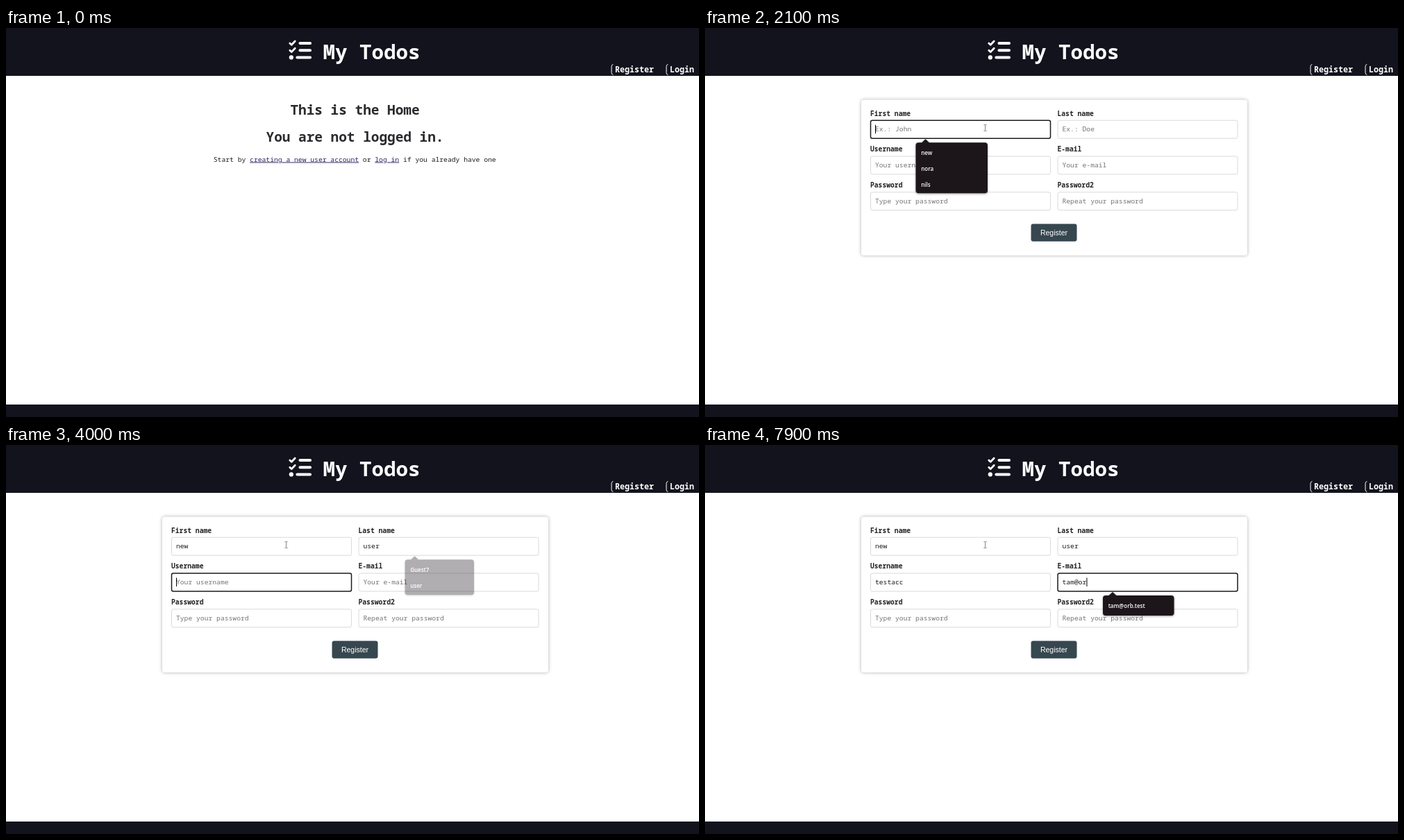
Recreate the animation shown at these times as an HTML page. Size 998x561 px, loop 8 s.

```html
<!DOCTYPE html>
<html lang="en">
<head>
<meta charset="utf-8">
<title>My Todos</title>
<style>
  html, body { margin: 0; width: 100%; height: 100%; overflow: hidden; background: #fff; }
  svg { display: block; }
  text { font-family: "Noto Sans Mono", monospace; font-size: 9.7px; fill: #1c1c20; white-space: pre; }
  .bar { fill: #12131d; }
  .title { font-size: 29.2px; font-weight: 700; fill: #fff; }
  .nav { font-size: 11.67px; font-weight: 700; fill: #fff; }
  .head { font-size: 19.4px; font-weight: 600; fill: #2b2b2f; text-anchor: middle; }
  .link { fill: #33245f; text-decoration: underline; }
  .label { font-weight: 600; fill: #222; }
  .hint { fill: #757575; }
  .card { fill: #fff; filter: drop-shadow(0 0 2.5px rgba(0, 0, 0, .32)); }
  .input { fill: #fff; stroke: #d9d9db; }
  .focus { stroke: #1b1b20; stroke-width: 1.5; }
  .button { font: 10.5px "Liberation Sans", Arial, sans-serif; fill: #fff; text-anchor: middle; }
  .pop { fill: #1c161b; filter: drop-shadow(0 1px 1.5px rgba(0, 0, 0, .4)); }
  .option { font: 600 8px "Open Sans", sans-serif; fill: #fff; }
  .status { font: 6.2px "Open Sans", sans-serif; fill: #c8c8cc; }
</style>
</head>
<body>
<svg width="998" height="561" viewBox="0 0 998 561">
  <rect class="bar" width="998" height="69"/>
  <rect class="bar" y="543" width="998" height="18"/>
  <g fill="none" stroke="#fff" stroke-linecap="round" stroke-linejoin="round">
    <path stroke-width="4.1" d="M423.5 22H438M423.5 32.3H438M419.4 42.5H438"/>
    <path stroke-width="2.8" d="M408.8 22l2.4 2.3 5-5.3M408.8 32.3l2.4 2.3 5-5.3"/>
    <path stroke-width="1" d="M874 52.5q-2 .5-2 3v9q0 2.500 2 3M953 52.500q-2 .5-2 3v9q0 2.500 2 3"/>
  </g>
  <circle cx="410.8" cy="42.4" r="3.100" fill="#fff"/>
  <text class="title" x="456.500" y="44.500">My Todos</text>
  <text class="nav" x="877" y="63.800">Register</text>
  <text class="nav" x="956" y="63.800">Login</text>

  <g id="home">
    <text class="head" x="502.500" y="124.500">This is the Home</text>
    <text class="head" x="502.500" y="163.500">You are not logged in.</text>
    <text x="298.800" y="192.500">Start by <tspan class="link">creating a new user account</tspan> or <tspan class="link">log in</tspan> if you already have one</text>
  </g>
  <g id="form"></g>
  <g id="overlay"></g>
</svg>
<script>
const LOOP = 8000, STEP = 100, ADVANCE = 5.82;
const [home, form, overlay] = ['home', 'form', 'overlay'].map(id => document.getElementById(id));

const fields = [
  ['First name', 'Ex.: John'], ['Last name', 'Ex.: Doe'],
  ['Username', 'Your username'], ['E-mail', 'Your e-mail'],
  ['Password', 'Type your password'], ['Password2', 'Repeat your password']
].map(([label, hint], i) => ({
  label, hint, x: i % 2 ? 508 : 238.5, y: 133.2 + 51.8 * (i >> 1)
}));

// Keyboard: [time, field, characters typed so far]
const values = ['new', 'user', 'testacc', 'tam@or'];
const keys = [
  [1900, 0, 0], [2500, 0, 1], [2800, 0, 2], [3000, 0, 3],
  [3100, 1, 0], [3600, 1, 1], [3700, 1, 2], [3800, 1, 4],
  [4000, 2, 0], [5000, 2, 1], [5100, 2, 3], [5300, 2, 4], [5400, 2, 5], [5500, 2, 6], [5600, 2, 7],
  [6100, 3, 0], [6700, 3, 1], [6800, 3, 2], [6900, 3, 3], [7300, 3, 4], [7800, 3, 5], [7900, 3, 6]
];

// Suggestions: [from, to, field, left, width, options, fades out]
const popups = [
  [2000, 2800, 0, 303.5, 103.5, ['new', 'nora', 'nils']],
  [2800, 3100, 0, 303.5, 103.5, ['new']],
  [3600, 4100, 1, 574.5, 99.5, ['Guest7', 'user'], true],
  [6700, 8000, 3, 573, 102.5, ['tam@orb.test']]
];

const text = (cls, x, y, str) => `<text class="${cls}" x="${x}" y="${y}">${str}</text>`;
const box = (cls, x, y, w, h, r) =>
  `<rect class="${cls}" x="${x}" y="${y}" width="${w}" height="${h}" rx="${r}"/>`;

function drawForm(t) {
  const done = keys.filter(k => k[0] <= t);
  const last = done[done.length - 1];
  let out = box('card', 225, 103.5, 556, 224.5, 4);
  fields.forEach(({ label, hint, x, y }, i) => {
    const key = done.filter(k => k[1] === i).pop();
    const count = key ? key[2] : 0;
    const focused = last && last[1] === i;
    out += text('label', x - .5, y - 6.7, label);
    out += box(focused ? 'input focus' : 'input', x, y, 259, 26, 2.5);
    out += count ? text('', x + 6.5, y + 16, values[i].slice(0, count))
                 : text('hint', x + 6.5, y + 16, hint);
    if (focused && (t - last[0] + 100) % 800 < 400) {
      out += `<rect x="${x + 6.5 + count * ADVANCE}" y="${y + 6.5}" width="1" height="12.5"/>`;
    }
  });
  out += '<rect x="469.5" y="282.5" width="66" height="25.300" rx="3" fill="#37474f"/>';
  return out + text('button', 502.5, 299, 'Register');
}

function drawPopup(t) {
  const pop = popups.find(p => t >= p[0] && t < p[1]);
  if (!pop) return '';
  const [from, to, field, x, w, options, fades] = pop;
  const y = fields[field].y + 32;
  const entering = from !== 2800 && t < from + STEP;
  const leaving = fades && t >= to - STEP;
  return `<g opacity="${entering || leaving ? .34 : 1}"><g class="pop">` +
    `<path d="M${x + 8} ${y + .5}l6-5.500 6 5.500z"/>` +
    `<rect x="${x}" y="${y}" width="${w}" height="${7 + 22 * options.length}" rx="4"/></g>` +
    options.map((o, i) => text('option', x + 7.7, y + 17.7 + 23 * i, o)).join('') + '</g>';
}

function drawStatus(t) {
  if (t < 1000 || t >= 1600) return '';
  const y = t < 1400 ? 548 : 557;
  return `<path fill="#3a3a40" d="M0 ${y}h110q2 0 2 2v14H0z"/>` +
    text('status', 4, y + 9, 'app.test/register');
}

function drawCursor(t) {
  if (t < 100) return '';
  const at = (x, y, shape) => `<g transform="translate(${x} ${y})">${shape}</g>`;
  if (t < 900) {
    const p = (t - 100) / 800, e = p * p * (3 - 2 * p);
    return at(361 + 69 * e, 296 - 106 * e,
      '<path d="M0 0v10l2.300-2 1.600 3.500 1.500-.7-1.500-3.300h3z" fill="#fff" stroke="#222" stroke-width=".7"/>');
  }
  if (t < 1200) {
    return at(430, 189,
      '<path d="M-1 0q1-1 2 0v4l4 1q1.500.5 1 2l-1 4H0l-3.500-4.500q0-1.500 2.500 0z" fill="#fff" stroke="#222" stroke-width=".7"/>');
  }
  const [x, y] = t < 1600 ? [429.5, 193.5] : t < 1700 ? [414, 164] : [403.5, 144];
  return at(x, y,
    '<path d="M-2-4.500h1.500l.5.5.5-.5H2M0-4v8M-2 4.500h1.500l.5-.5.5.5H2" fill="none" stroke="#777" stroke-width=".9"/>');
}

let shown = -1;
function frame(now) {
  const t = Math.floor(now % LOOP / STEP) * STEP;
  if (t !== shown) {
    shown = t;
    const opened = t >= 1200;
    home.style.display = opened ? 'none' : '';
    form.innerHTML = opened ? drawForm(t) : '';
    overlay.innerHTML = drawPopup(t) + drawStatus(t) + drawCursor(t);
  }
  requestAnimationFrame(frame);
}
const start = performance.now();
frame(0);
function tick() { return performance.now() - start; }
</script>
</body>
</html>
```
